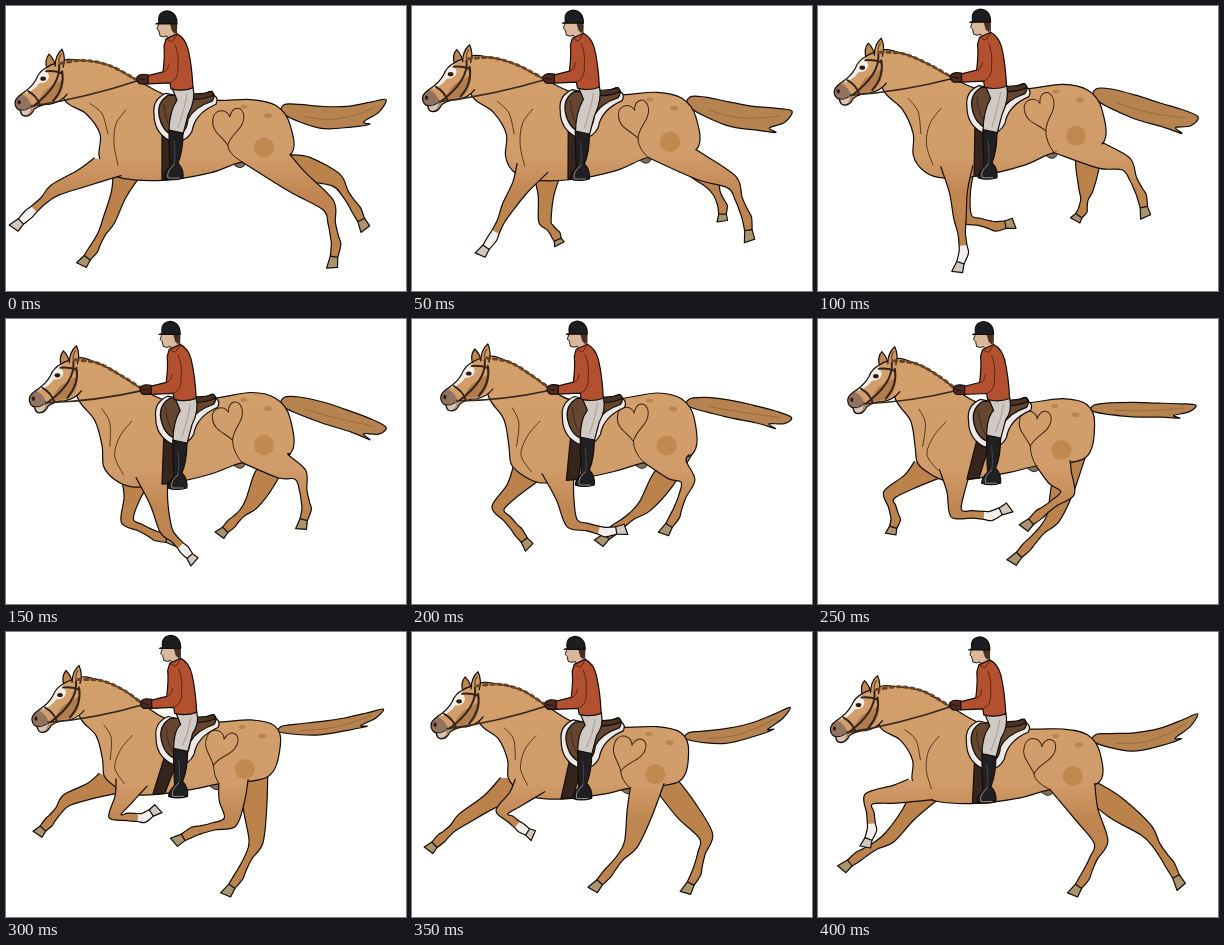
Write an HTML page that moves like this. It is 400 px wide and 285 px high and loops after 0.45 s.

```html
<!DOCTYPE html>
<html lang="en">
<head>
<meta charset="utf-8">
<title>Gallop</title>
<style>
html, body { margin: 0; width: 100%; height: 100%; overflow: hidden; background: #fff; }
svg { display: block; width: 100%; height: 100%; }
#art path, #art ellipse { stroke-linejoin: round; stroke-linecap: round; }
</style>
</head>
<body>
<svg viewBox="0 0 400 285">
  <defs>
    <linearGradient id="coat" gradientUnits="userSpaceOnUse" x1="0" y1="50" x2="0" y2="260">
      <stop offset="0" stop-color="#d3a06c"/>
      <stop offset=".48" stop-color="#d09c69"/>
      <stop offset=".66" stop-color="#c08651"/>
      <stop offset="1" stop-color="#bb824c"/>
    </linearGradient>
  </defs>
  <g id="art"></g>
</svg>
<script>
const LOOP = 450, STEP = 50, INK = '#140d06', COAT = 'url(#coat)', FAR = '#bb824c';
const art = document.getElementById('art');

const points = s => s.split(' ').map(p => p.split(',').map(Number));
const mix = (a, b, t) => a.map((v, i) => v + (b[i] - v) * t);
const ramp = (from, to, v) => Math.max(0, Math.min(1, (v - from) / (to - from)));
const n1 = v => v.toFixed(1);
const xy = p => p.map(n1).join(' ');

// Standing outline: poll, crest, back, croup, buttock, flank, belly, chest, throat
const OUTLINE = points('55,58 78,55 104,60 135,77 165,92 210,97 245,97 270,103 284,122 284,151 ' +
  '236,158 205,169 160,176 118,174 100,165 93,150 94,128 80,108 58,94');

// Tail edge: share of the length, distance from the centre line
const TAIL = points('0,-4 .15,-9 .38,-11 .62,-9 .85,-5 1,0 .93,9 .78,12 .84,17 .66,13 .35,11 0,6');

// Stride: knee or hock, then toe, at each key time
const KEYS = [0, 100, 200, 300, 350, 400];
const STRIDE = {
  nearFore: points('49,184,7,223 142,212,139,267 160,204,215,210 109,184,153,176 90,180,122,204 51,167,47,216'),
  farFore: points('103,214,75,260 148,212,197,217 86,189,118,229 61,168,31,203 51,187,16,219 72,205,23,238'),
  nearHind: points('322,199,326,263 308,158,328,212 276,162,251,216 224,190,167,211 219,212,180,259 283,210,254,264'),
  farHind: points('330,174,360,224 268,184,257,215 233,187,186,225 250,210,219,264 294,204,273,262 328,198,364,256')
};

// Smooth periodic value through the keys
function sample(keys, t) {
  const n = KEYS.length;
  const time = i => KEYS[(i + n) % n] + LOOP * Math.floor(i / n);
  const key = i => keys[(i + n) % n];
  const slope = (i, j) => (key(i + 1)[j] - key(i - 1)[j]) / (time(i + 1) - time(i - 1));
  let i = n - 1;
  while (KEYS[i] > t) i--;
  const h = time(i + 1) - time(i), u = (t - time(i)) / h, ease = u * u * (3 - 2 * u);
  return key(i).map((v, j) => v + (key(i + 1)[j] - v) * ease +
    h * u * (1 - u) * (slope(i, j) * (1 - u) - slope(i + 1, j) * u));
}

// The whole body follows a few slow waves
function sway(t) {
  const wave = peak => Math.cos((t - peak) / LOOP * 2 * Math.PI);
  const up = (size, peak) => -size * (1 + wave(peak));
  const head = [10.5 + 10.5 * wave(235), up(9.5, 195)];
  const hip = up(12, 170), belly = up(6, 270), pull = 24 * Math.max(0, wave(300));
  const warp = ([x, y]) => {
    const low = ramp(120, 160, y), rear = ramp(110, 240, x);
    const reach = ramp(160, 90, x) * Math.min(1, Math.abs(y - 135) / 45);
    return [
      x + head[0] * reach - pull * rear * ramp(100, 155, y),
      y + head[1] * ramp(115, 55, x) * ramp(135, 95, y) + hip * rear * (1 - .4 * low) +
        belly * ramp(130, 170, y) * ramp(240, 190, x)
    ];
  };
  return { wave, head, hip, belly, pull, warp };
}

// Smooth curve through points, continuing from the first one
function curve(pts, closed) {
  const n = pts.length, at = i => closed ? pts[(i + n) % n] : pts[Math.max(0, Math.min(n - 1, i))];
  let d = '';
  for (let i = 0; i < (closed ? n : n - 1); i++) {
    const [p, a, b, q] = [at(i - 1), at(i), at(i + 1), at(i + 2)];
    d += `C${xy(a.map((v, j) => v + (b[j] - p[j]) / 6))} ${xy(b.map((v, j) => v - (q[j] - a[j]) / 6))} ${xy(b)}`;
  }
  return d;
}
const path = (d, fill = 'none', stroke = INK, w = 1.2) =>
  `<path d="${d}" fill="${fill}" stroke="${stroke}" stroke-width="${w}"/>`;
const poly = (pts, fill, stroke) => path('M' + pts.map(xy).join('L') + 'Z', fill, stroke);
const loop = (pts, fill) => path('M' + xy(pts[0]) + curve(pts, true) + 'Z', fill);
const line = (pts, stroke, w) => path('M' + xy(pts[0]) + curve(pts), 'none', stroke, w);
const blob = ([x, y], rx, ry, fill) => `<ellipse cx="${n1(x)}" cy="${n1(y)}" rx="${rx}" ry="${ry}" fill="${fill}"/>`;
const group = ([x, y], s, turn = 0) => `<g transform="translate(${n1(x)} ${n1(y)}) rotate(${n1(turn)})">${s}</g>`;

function limb(front, rear, [kx, ky, tx, ty], upper, fill, white) {
  const top = mix(front, rear, .5), knee = [kx, ky], toe = [tx, ty];
  const dx = tx - kx, dy = ty - ky, len = Math.hypot(dx, dy);
  // An upright leg sinks at the fetlock
  const sink = 6 * (dy - Math.abs(dx)) / len;
  const fetlock = mix(knee, toe, .62).map((v, i) => v + sink * (i ? -dx : dy) / len);
  const chain = [top, mix(top, knee, .5), knee, mix(knee, fetlock, .45), mix(knee, fetlock, .8),
    fetlock, mix(fetlock, toe, .5), toe];
  const width = [0, upper, upper > 20 ? 14 : 12.5, 7.5, 8, 9.5, 7.5, 11];
  const side = s => chain.map((p, i) => {
    const u = chain[Math.max(0, i - 1)], v = chain[Math.min(7, i + 1)];
    const ex = v[0] - u[0], ey = v[1] - u[1], r = s * width[i] / 2 / (Math.hypot(ex, ey) || 1);
    return [p[0] - ey * r, p[1] + ex * r];
  });
  const l = side(1), r = side(-1), up = r.slice(1, 7).reverse();
  const cl = curve([front, ...l.slice(1, 7)]), cr = curve([...up, rear]);
  let s = path(`M${xy(front)}${cl}L${xy(r[6])}${cr}L${xy(mix(top, knee, -.18))}Z`, fill, 'none');
  if (white) s += poly([...l.slice(4, 7), ...r.slice(4, 7).reverse()], '#f3eeee', 'none');
  s += path(`M${xy(front)}${cl}M${xy(r[6])}${cr}`);
  return s + poly([l[6], l[7], mix(r[6], r[7], .8), r[6]], white ? '#cfc7c0' : '#a8946f');
}

function foreleg(key, belly, upper, fill, white) {
  const root = [82 + .4 * key[0], 162 + belly];
  const dx = key[0] - root[0], dy = key[1] - root[1], len = Math.hypot(dx, dy);
  const vx = dy / len + 1, vy = -dx / len, r = 16 / Math.hypot(vx, vy);
  return limb([root[0] - vx * r, root[1] - vy * r], [root[0] + vx * r, root[1] + vy * r], key, upper, fill, white);
}

function tail([x, y], wave) {
  const tip = [x + 102, 93 + 18 * wave(110)];
  const sag = 7 + 5 * wave(50), thick = .85 + .25 * wave(70);
  const at = ([s, w]) => [x + (tip[0] - x) * s, y + (tip[1] - y) * s * s + sag * Math.sin(Math.PI * s) + w * thick];
  return loop(TAIL.map(at), '#b58250') + line([.2, .45, .7, .88].map(s => at([s, 2])), '#946539', .8);
}

const HEAD =
  path('M41 64Q38 55 43 49Q49 55 49 62', '#bd8752') +
  path('M58 57Q48 57 41 62Q33 66 30 74Q26 82 15 89Q8 94 9 99Q10 104 14 105Q15 111 19 111Q25 111 28 104Q35 99 44 99Q55 97 61 89L66 91L66 60Z', COAT, 'none') +
  path('M57 74Q58 92 45 97Q36 98 30 101Q34 91 40 84Z', '#b27d4c', 'none') +
  path('M40 63Q33 66 30 74Q26 82 18 87L21 88Q30 83 33 78Q42 78 43 71Z', '#f4eee8', 'none') +
  path('M16 89Q8 94 9 99Q10 104 14 105Q15 111 19 111Q25 110 26 103Q25 94 16 89Z', '#927260', 'none') +
  path('M15 105Q16 110 19 110Q24 110 25 103Z', '#d9c5b8', 'none') +
  path('M54 58Q47 58 41 62Q33 66 30 74Q26 82 15 89Q8 94 9 99Q10 104 14 105Q15 111 19 111Q25 111 28 104Q35 99 44 99Q55 97 61 89') +
  path('M49 61Q49 50 56 44Q60 53 57 62', '#cf9a66') +
  path('M53 59Q52 53 55 49', 'none', '#80522f', 1.5) +
  path('M14 105Q19 106 23 103', 'none', INK, .9) +
  blob([13, 97], 1.6, 2.2, '#2d1c17') + blob([37, 73.5], 2.8, 2.1, '#2b1a12') +
  path('M40 66Q48 65 56 68M53 60Q55 80 27 101M22 86Q31 91 34 100M56 66Q59 82 47 96', 'none', '#33231b', 2) +
  blob([25, 101], 2, 2, '#777');

const SADDLE =
  path('M160 89Q146 95 148 110Q148 128 163 136Q179 141 186 127Q189 109 210 100Q213 94 208 91Q190 96 160 89Z', '#ece9e6') +
  path('M162 91Q151 98 153 111Q156 127 167 131Q181 131 182 115Q188 103 206 97Q211 89 204 87Q191 94 178 91Z', '#654631') +
  path('M181 94Q194 97 208 91L206 87Q194 91 182 89Z', '#4a3224') +
  path('M158 100Q159 122 170 129M180 102Q184 106 179 121', 'none', '#3a271c', .9);

const TORSO =
  path('M153 17L151 23L153 25L154 30Q158 32 161 30L163 34L171 31L170 18Z', '#d9b89c', INK, .9) +
  path('M164 18L171 17Q172 25 169 28L166 25Z', '#4a3023', 'none') +
  path('M153 17Q151 6 161 5Q171 6 171 18L165 18L150 18Z', '#1c1d20') +
  path('M160 33L171 28Q179 32 182 43Q186 60 187 82Q176 86 165 83L164 77L142 78L141 70L157 66Q159 50 158 40Z', '#b2502f') +
  path('M164 77Q173 74 172 60Q173 48 169 39M160 33L166 36L171 29M158 66Q162 65 163 58', 'none', '#65240f', 1);

const GLOVE = path('M142 69Q134 67 131 71Q130 76 134 78L142 78Z', '#4e2a22') + path('M133 73L139 74', 'none', INK, .8);

const BOOT =
  path('M163 125L177 128Q177 146 172 158Q178 164 177 173Q166 176 158 173Q158 168 164 162Q163 148 163 125Z', '#202023') +
  path('M168 136Q170 150 168 160', 'none', '#4a4a50', .9) +
  path('M168 160Q160 166 162 173L173 173', 'none', '#8b8b8b', 1);

const HEART = path('M0 22C-6 12 -16 8 -14 -4C-13 -15 1 -15 3 -6C5 -18 18 -17 17 -5C16 7 4 10 0 22', 'none', '#3a2412', 1);

function breeches(torso, boot) {
  const hip = (x, y) => xy([x + torso[0], y + torso[1]]), knee = (x, y) => xy([x + boot[0], y + boot[1]]);
  return path(`M${hip(166, 82)}L${hip(187, 81)}Q${hip(190, 94)} ${knee(182, 110)}L${knee(177, 129)}L${knee(163, 127)}` +
    `Q${knee(163, 107)} ${hip(171, 94)}Z`, '#d0c9c4') +
    path(`M${hip(181, 88)}Q${hip(179, 102)} ${knee(172, 122)}`, 'none', '#a0978f', .9);
}

function draw(t) {
  const { wave, head, hip, belly, pull, warp } = sway(t);
  const body = OUTLINE.map(warp), buttock = body[9], flank = body[10], girth = body[12];
  const key = name => sample(STRIDE[name], t);
  const torso = [head[0] * .22, head[1] * .15];
  const boot = [head[0] * .27, belly * .75];
  const saddle = [head[0] * .12, hip * .5];
  const heart = warp([221, 120]), turn = 18 * wave(330), r = turn * Math.PI / 180;
  const tip = [heart[0] - 22 * Math.sin(r), heart[1] + 22 * Math.cos(r)];

  let s = tail(warp([278, 106]), wave);
  s += limb(mix(flank, buttock, .45), buttock, key('farHind'), 23, FAR);
  s += foreleg(key('farFore'), belly, 16, FAR);
  s += path(`M${xy([flank[0] - 11, flank[1]])}q8 9 13 4l3 -8z`, '#80715c', INK, .8);
  s += loop(body, COAT);
  s += limb(flank, mix(buttock, flank, pull / 60), key('nearHind'), 25, COAT);
  s += foreleg(key('nearFore'), belly, 18, COAT, true);

  s += blob(warp([238, 104]), 3.5, 2, '#b98450') + blob(warp([262, 113]), 4, 2.5, '#b98450');
  s += blob(warp([258, 144]), 10, 10, '#bf8950');
  s += group(heart, HEART, turn);
  s += path(`M${xy(tip)}Q${xy([tip[0], (tip[1] + flank[1]) / 2])} ${xy(flank)}`, 'none', '#3a2412', 1);
  for (const crease of ['84,98 96,108 102,128', '120,104 110,118 108,138 112,160'])
    s += line(points(crease).map(warp), '#4a2e16', .9);

  s += group(head, HEAD);
  s += `<path d="M${xy(body[0])}${curve(body.slice(0, 4))}" fill="none" stroke="#6b4424" stroke-width="3" stroke-dasharray="3 4"/>`;
  s += poly([[156 + saddle[0], 131 + saddle[1]], [169 + saddle[0], 134 + saddle[1]],
    [girth[0] + 8, girth[1] - 1], [girth[0] - 4, girth[1]]], '#35251d');
  s += group(saddle, SADDLE) + breeches(torso, boot) + group(boot, BOOT) + group(torso, TORSO);
  const bit = [25 + head[0], 101 + head[1]], hand = [134 + torso[0], 74 + torso[1]];
  const [mx, my] = mix(bit, hand, .5);
  s += path(`M${xy(bit)}Q${xy([mx, my + 5])} ${xy(hand)}`, 'none', '#35261e', 1.6);
  art.innerHTML = s + group(torso, GLOVE);
}

const start = performance.now();
let shown = -1;
function tick() {
  const t = Math.floor((performance.now() - start) / STEP) * STEP % LOOP;
  if (t !== shown) draw(shown = t);
  requestAnimationFrame(tick);
}
tick();
</script>
</body>
</html>
```
